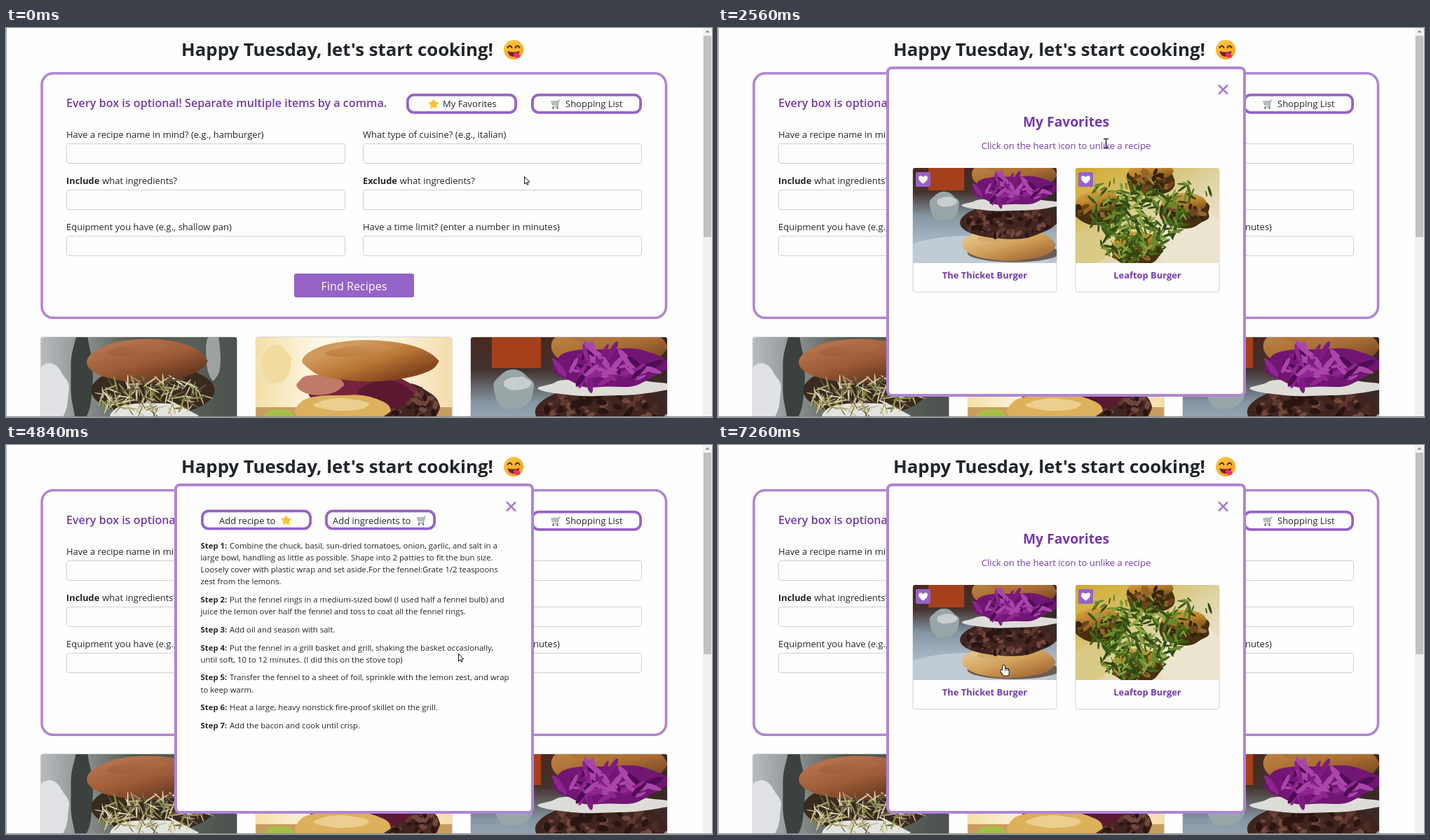
An HTML page with a canvas that plays this animation: 1007 px wide and 556 px high, repeating every 8000 ms.

```html
<!DOCTYPE html>
<html lang="en">
<head>
<meta charset="utf-8">
<title>Recipe finder</title>
<style>
html, body { margin: 0; width: 100%; height: 100%; overflow: hidden; background: #fefefe; }
canvas { display: block; }
</style>
</head>
<body>
<canvas id="stage" width="1007" height="556"></canvas>
<script>
const W = 1007, H = 556, LOOP = 8000, BASE = 13;
const PAGE = '#fefefe', INK = '#212529', PURPLE = '#7439ab', MID = '#9663c6', SOFT = '#b085d4';
const stage = document.getElementById('stage').getContext('2d');
let g, zones, rnd;

// ---- drawing helpers ----
// Draws a line of text, remembers where it is and returns its width
function text(str, x, y, size = BASE, { color = INK, weight = 400, center = false } = {}) {
  g.font = `${weight} ${size}px "Open Sans", "Noto Sans", sans-serif`;
  g.fillStyle = color;
  const w = g.measureText(str).width, left = center ? x - w / 2 : x;
  g.fillText(str, left, y);
  zones.words.push([left, left + w, y - size, y + size * 0.3]);
  return w;
}

function box(x, y, w, h, r, line, width, fill = PAGE) {
  g.beginPath();
  g.roundRect(x + width / 2, y + width / 2, w - width, h - width, r - width / 2);
  g.fillStyle = fill;
  g.fill();
  if (!line) return;
  g.strokeStyle = line;
  g.lineWidth = width;
  g.stroke();
}

function rect(color, x, y, w, h) {
  g.fillStyle = color;
  g.fillRect(x, y, w, h);
}

function oval(color, x, y, rx, ry = rx, turn = 0) {
  g.fillStyle = color;
  g.beginPath();
  g.ellipse(x, y, rx, ry, turn, 0, Math.PI * 2);
  g.fill();
}

function path(d, fill, line, width = 1) {
  const p = new Path2D(d);
  if (fill) { g.fillStyle = fill; g.fill(p); }
  if (line) { g.strokeStyle = line; g.lineWidth = width; g.stroke(p); }
}

function at(x, y, draw) {
  g.save();
  g.translate(x, y);
  draw();
  g.restore();
}

function shade(x0, y0, x1, y1, ...colors) {
  const grad = g.createLinearGradient(x0, y0, x1, y1);
  colors.forEach((c, i) => grad.addColorStop(i / (colors.length - 1), c));
  return grad;
}

function random(seed) {
  return () => (seed = (seed * 16807) % 2147483647) / 2147483647;
}

// ---- food ----
// Uneven rounded patch
function blob(color, x, y, rx, ry, rough = 0.1) {
  const n = 16, p = [];
  for (let i = 0; i < n; i++) {
    const a = i / n * Math.PI * 2, r = 1 + (rnd() - 0.5) * 2 * rough;
    p.push([x + Math.cos(a) * rx * r, y + Math.sin(a) * ry * r]);
  }
  g.fillStyle = color;
  g.beginPath();
  p.forEach(([px, py], i) => {
    const [qx, qy] = p[(i + 1) % n];
    g.quadraticCurveTo(px, py, (px + qx) / 2, (py + qy) / 2);
  });
  g.fill();
}

// Many thin ovals spread over an elliptic area
function flecks(n, colors, x, y, rx, ry, len, thin) {
  while (n--) {
    const a = rnd() * 6.28, r = Math.sqrt(rnd());
    const l = len * (0.4 + rnd() * 0.6), color = colors[Math.floor(rnd() * colors.length)];
    oval(color, x + Math.cos(a) * r * rx, y + Math.sin(a) * r * ry, l, l * thin, rnd() * Math.PI);
  }
}

// Domed bread, lit from above
function bun(x, y, rx, ry, light, body, dark) {
  blob(shade(x, y - ry, x + rx * 0.2, y + ry, light, body, dark), x, y, rx, ry, 0.03);
  oval(shade(x, y - ry, x, y, light, body), x - rx * 0.15, y - ry * 0.5, rx * 0.5, ry * 0.25, -0.1);
}

function patty(x, y, rx, ry) {
  blob('#40241f', x, y, rx, ry, 0.05);
  flecks(110, ['#5d3830', '#2a1513', '#71483d', '#4b2b25'], x, y, rx * 0.92, ry * 0.88, 8, 0.6);
}

function sproutBurger() {
  rect(shade(0, 0, 280, 0, '#b9bcbf', '#868b8b', '#4c5446', '#59605a', '#4a504c'), 0, 0, 280, 186);
  blob('#dfe1e5', 14, 84, 28, 44);
  blob('#3b413f', 58, 56, 16, 70);
  blob('#9ea3a2', 246, 26, 11, 36);
  oval('#382a1e', 160, 76, 88, 36);
  bun(150, 34, 86, 32, '#b2714a', '#9c5a36', '#65371f');
  blob('#e3e4e0', 158, 112, 62, 18);
  flecks(150, ['#c9c095', '#858f4b', '#e2dcc0', '#65503a', '#aea675'], 160, 84, 78, 26, 15, 0.09);
}

function onionBurger() {
  rect(shade(0, 0, 280, 0, '#f3e0a8', '#fdf8e8', '#fdf6e4', '#f4dcaa'), 0, 0, 280, 186);
  rect('#c79d5f', 0, 100, 280, 86);
  blob('#f2dba0', 30, 40, 22, 28);
  patty(200, 100, 62, 36);
  blob('#a6bd48', 34, 112, 20, 10);
  blob('#74243c', 152, 74, 76, 28);
  blob('#5a1930', 184, 82, 40, 20);
  blob('#c07a68', 92, 68, 32, 16);
  blob('#ddb05c', 122, 106, 68, 24);
  blob('#ecce8e', 122, 96, 38, 9);
  bun(162, 34, 97, 30, '#d09a5c', '#b97535', '#84461f');
}

function cabbageBurger() {
  rect(shade(0, 0, 0, 186, '#4a281f', '#43322d', '#8496a2', '#a5b6c2', '#b9c6ce'), 0, 0, 280, 186);
  rect('#a63f1c', 30, 0, 70, 44);
  rect('#3a2a27', 230, 0, 50, 110);
  blob('#98a6a8', 62, 76, 30, 28);
  blob('#c6cfcd', 66, 66, 20, 10);
  oval('#bfccd5', 120, 172, 150, 40);
  oval('#6b5d54', 196, 166, 90, 18);
  bun(186, 150, 94, 32, '#e0bf84', '#cf9e58', '#a9713a');
  patty(184, 104, 94, 36);
  bun(196, 14, 84, 36, '#bd8445', '#a96d33', '#6d4123');
  blob('#dddcd6', 196, 72, 88, 14, 0.2);
  blob('#711673', 196, 44, 82, 28, 0.14);
  flecks(50, ['#8f2690', '#a946aa', '#4f0d54', '#7d1b80'], 196, 42, 72, 24, 20, 0.25);
}

function leafBurger() {
  rect(shade(0, 0, 120, 186, '#cfa92e', '#d5bb58', '#dcd09a', '#e6dfc4'), 0, 0, 280, 186);
  blob('#ebe5d0', 232, 146, 76, 64);
  blob('#d9ca86', 24, 156, 40, 36);
  for (const [x, y] of [[146, 14], [44, 72], [212, 76], [118, 152]]) {
    blob('#46300f', x, y + 10, 50, 32);
    bun(x, y - 8, 44, 20, '#d8a441', '#b9822c', '#7a4d1b');
    flecks(30, ['#6d4719', '#96672a', '#35220f'], x, y + 12, 44, 22, 10, 0.5);
  }
  const greens = ['#4a6a1c', '#2f4a14', '#6a8a2c', '#3c5a18', '#8ba23f'];
  flecks(170, greens, 124, 96, 92, 50, 15, 0.22);
  flecks(90, greens, 112, 140, 66, 40, 15, 0.22);
  flecks(70, greens, 136, 48, 130, 26, 13, 0.22);
}

// Shows a 280 by 186 picture at the given width
function photo(draw, x, y, w, h) {
  g.save();
  g.beginPath();
  g.roundRect(x, y, w, h, [3, 3, 0, 0]);
  g.clip();
  g.translate(x, y);
  g.scale(w / 280, w / 280);
  rnd = random(77);
  draw();
  g.restore();
}

// ---- icons ----
function star(x, y) {
  g.beginPath();
  for (let i = 0; i < 10; i++) {
    const a = i * Math.PI / 5 - Math.PI / 2, r = i % 2 ? 3.7 : 6.8;
    g.lineTo(x + Math.cos(a) * r, y + Math.sin(a) * r);
  }
  g.closePath();
  g.lineJoin = 'round';
  g.fillStyle = g.strokeStyle = '#fbc531';
  g.lineWidth = 1.2;
  g.fill();
  g.stroke();
}

function cart(x, y) {
  at(x, y, () => {
    path('M6.5 -6L4.5 -5.5L3 3.5H-4.5', null, '#6d7780', 0.9);
    for (let i = 0; i < 4; i++) {
      path(`M${i * 0.5 - 6.5} ${i * 1.8 - 4.4}H${4.2 - i * 0.3}M${i * 2.6 - 6} -4.4L${i * 2 - 4.6} 1`, null, '#8d969e', 0.8);
    }
    for (const wx of [-3.5, 2.6]) oval('#4a4f55', wx, 5.4, 1.2);
  });
}

function face(x, y) {
  at(x, y, () => {
    oval(shade(-8, -14, 8, 14, '#ffc93f', '#f59a23'), 0, 0, 14);
    g.lineCap = 'round';
    path('M-8.5 -3Q-5.5 -8 -2.5 -3M2.5 -3Q5.5 -8 8.5 -3', null, '#4b2b24', 2);
    path('M-8.5 2Q0 5 8.5 2Q7 10 0 10Q-7 10 -8.5 2Z', '#6b2430');
    oval('#ee2f6b', 4.5, 8, 5, 3.4, 0.5);
    g.lineCap = 'butt';
  });
}

function heart(x, y) {
  box(x, y, 21, 21, 2, null, 0, MID);
  at(x + 10.5, y + 10.5, () => path('M0 6C-11 -1 -6 -9 0 -3.5C6 -9 11 -1 0 6Z', '#fff'));
}

function pill(x, y) {
  box(x, y, 158, 29, 11, MID, 3.8);
  zones.links.push([x, x + 158, y, y + 29]);
}

// ---- screens ----
const FORM = [
  ['', 'Have a recipe name in mind? (e.g., hamburger)'], ['', 'What type of cuisine? (e.g., italian)'],
  ['Include', 'what ingredients?'], ['Exclude', 'what ingredients?'],
  ['', 'Equipment you have (e.g., shallow pan)'], ['', 'Have a time limit? (enter a number in minutes)']
];

function home() {
  rect(PAGE, 0, 0, W, H);
  text("Happy Tuesday, let's start cooking!", 250, 40, 25.8, { weight: 700 });
  face(724, 31);
  box(49.3, 63, 894, 353, 18, SOFT, 3.6);
  text('Every box is optional! Separate multiple items by a comma.', 86, 113, 16.13, { color: PURPLE, weight: 600 });
  pill(571, 93.7);
  star(610, 109);
  text('My Favorites', 623, 113);
  pill(749, 93.7);
  cart(784, 109);
  text('Shopping List', 798, 113);

  FORM.forEach(([strong, label], i) => {
    const x = i % 2 ? 509 : 86, y = 157 + Math.floor(i / 2) * 65.8;
    const w = strong && text(strong, x, y, 12.8, { weight: 700 }) + 4;
    text(label, x + Number(w), y);
    box(x, Math.round(y) + 8, 398, 29, 4, '#ced0d6', 1);
  });

  box(411, 351, 171, 34, 3, null, 0, MID);
  text('Find Recipes', 496.5, 374.5, 16.15, { color: '#fff', center: true });

  [sproutBurger, onionBurger, cabbageBurger].forEach((draw, i) => {
    const x = 49 + i * 306.75;
    box(x, 441, 281, 200, 4, '#d4d4d4', 1);
    photo(draw, x + 0.5, 442, 280, 186);
  });

  rect('#f1f1f1', 994, 0, 13, H);
  rect('#c1c1c1', 995, 11, 11, 288);
  path('M997.5 6.5L1000.5 3L1003.5 6.5Z', '#8f8f8f');
  rect('#a3a3a3', 0, 0, 1, H);
  rect('#8c8c8c', 0, 555, W, 1);
}

function dialog() {
  home();
  zones.words.length = zones.links.length = 0;
  box(240, 55, 513, 472, 8, SOFT, 4);
  path('M714 81.5L727 94.5M727 81.5L714 94.5', null, '#a87cd0', 2.5);
}

function favorites() {
  dialog();
  const plain = { color: PURPLE, center: true }, bold = { ...plain, weight: 700 };
  text('My Favorites', 496.5, 141, 19.25, bold);
  text('Click on the heart icon to unlike a recipe', 496.5, 173, BASE, plain);
  [[cabbageBurger, 'The Thicket Burger'], [leafBurger, 'Leaftop Burger']].forEach(([draw, name], i) => {
    const x = 277.5 + i * 232;
    box(x, 200, 206, 178, 4, '#d2d2d2', 1);
    photo(draw, x + 0.5, 200, 205, 136);
    heart(x + 4.5, 206);
    text(name, x + 103, 358, 12.9, bold);
    zones.links.push([x, x + 206, 200, 378]);
  });
}

const STEPS = [
  ['Combine the chuck, basil, sun-dried tomatoes, onion, garlic, and salt in a',
    'large bowl, handling as little as possible. Shape into 2 patties to fit the bun size.',
    'Loosely cover with plastic wrap and set aside.For the fennel:Grate 1/2 teaspoons',
    'zest from the lemons.'],
  ['Put the fennel rings in a medium-sized bowl (I used half a fennel bulb) and',
    'juice the lemon over half the fennel and toss to coat all the fennel rings.'],
  ['Add oil and season with salt.'],
  ['Put the fennel in a grill basket and grill, shaking the basket occasionally,',
    'until soft, 10 to 12 minutes. (I did this on the stove top)'],
  ['Transfer the fennel to a sheet of foil, sprinkle with the lemon zest, and wrap',
    'to keep warm.'],
  ['Heat a large, heavy nonstick fire-proof skillet on the grill.'],
  ['Add the bacon and cook until crisp.']
];

function recipe() {
  dialog();
  pill(278, 92.5);
  text('Add recipe to', 304, 112.5);
  star(399.5, 108);
  pill(455, 92.5);
  text('Add ingredients to', 466, 112.5);
  cart(592.5, 108);
  let y = 148;
  STEPS.forEach((lines, i) => {
    text(`Step ${i + 1}:`, 277.5, y, 11.4, { weight: 700 });
    lines.forEach((line, n) => {
      text(line, n ? 277.5 : 319, y, 11.37);
      y += 17.15;
    });
    y += 8.5;
  });
}

function render(draw) {
  const image = document.createElement('canvas');
  image.width = W;
  image.height = H;
  g = image.getContext('2d');
  zones = { words: [], links: [] };
  draw();
  return { image, ...zones };
}

const [homeView, listView, recipeView] = [home, favorites, recipe].map(render);

// ---- timeline ----
const viewAt = t => t < 1500 ? homeView : t < 4810 || t >= 6650 ? listView : recipeView;

// Each move slows down towards its goal; the vertical part may slow down harder
const MOVES = [
  { from: 530, to: 1100, x: 707, y: 113, slow: 3 },
  { from: 2200, to: 2830, x: 494, y: 185, slow: 1.5 },
  { from: 3480, to: 4030, x: 645, y: 298, slow: 2 },
  { from: 5610, to: 6410, x: 726, y: 79, slow: 1.2, slowY: 2.6 },
  { from: 6650, to: 7260, x: 407.5, y: 315, slow: 1.7 }
];

function pointer(t) {
  let x = 739, y = 212;
  for (const m of MOVES) {
    const left = 1 - Math.min(1, Math.max(0, (t - m.from) / (m.to - m.from)));
    x = m.x + (x - m.x) * left ** m.slow;
    y = m.y + (y - m.y) * left ** (m.slowY || m.slow);
    if (left > 0) break;
  }
  return [x, y];
}

function hand() {
  const shape = new Path2D();
  shape.roundRect(-1.4, 0, 2.8, 10, 1.4);
  shape.roundRect(-1.4, 5, 8.6, 9.5, 2.5);
  shape.ellipse(-1.8, 9.6, 3.2, 1.5, 0.9, 0, 7);
  g.strokeStyle = '#111';
  g.lineWidth = 2;
  g.stroke(shape);
  g.fillStyle = '#fff';
  g.fill(shape);
  for (const x of [1.6, 3.6, 5.6]) rect('#111', x, 5, 0.7, 3);
}

function cursor(t) {
  const [x, y] = pointer(t), view = viewAt(t - 25);
  const over = list => list.some(([a, b, c, d]) => x >= a && x <= b && y >= c && y <= d);
  const onClose = view === recipeView && t >= 6430;
  at(x, y, () => {
    if (onClose || over(view.links)) hand();
    else if (over(view.words)) path('M-3.5 -6.5H3.5M0 -6.5V6.5M-3.5 6.5H3.5', null, '#333', 1.5);
    else path('M.5 .5V11L3 8.8L4.4 12.2L6 11.5L4.5 8.2L7.8 7.9Z', '#fff', '#111');
  });
}

const begin = performance.now();
function frame() {
  const t = (performance.now() - begin) % LOOP;
  g = stage;
  g.drawImage(viewAt(t).image, 0, 0);
  cursor(t);
  requestAnimationFrame(frame);
}
frame();
</script>
</body>
</html>
```
